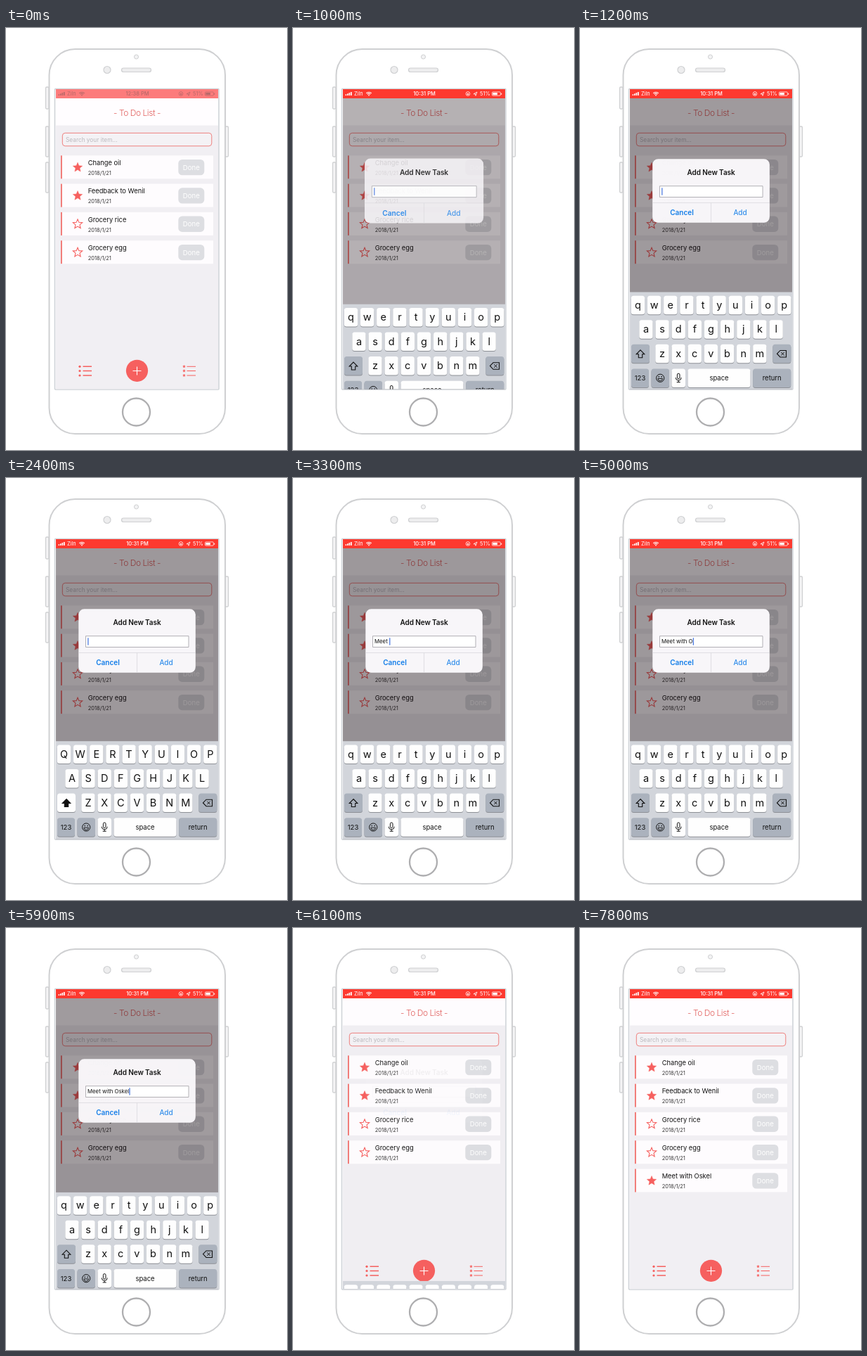
Animation, 400 px wide and 600 px high, one loop 8 s. Source, as an HTML page with a canvas:

```html
<!DOCTYPE html>
<html lang="en">
<head>
<meta charset="utf-8">
<title>To Do List</title>
<style>
  html, body { margin: 0; width: 100%; height: 100%; overflow: hidden; background: #fff; }
  canvas { display: block; width: 400px; height: 600px; }
</style>
</head>
<body>
<canvas></canvas>
<script>
const LOOP = 8000;
const OPEN = 850, CLOSE = 5900, ITEM_ADDED = 6200, ITEM_STARRED = 7000;
const RED = '#f6605f', INK = '#111';
const typing = [
  [2500, 'M'], [2700, 'e'], [2900, 'e'], [3000, 't'], [3300, ' '],
  [3800, 'w'], [4000, 'i'], [4100, 't'], [4200, 'h'], [4400, ' '],
  [4900, 'O'], [5200, 's'], [5400, 'k'], [5600, 'e'], [5700, 'l']
];
const tasks = [
  ['Change oil', true], ['Feedback to Wenil', true],
  ['Grocery rice', false], ['Grocery egg', false]
];

const canvas = document.querySelector('canvas');
const ctx = canvas.getContext('2d');
const scale = window.devicePixelRatio || 1;
canvas.width = 400 * scale;
canvas.height = 600 * scale;

const between = (t, from, to) => t >= from && t < to;
const mix = (a, b, p) => `rgb(${a.map((v, i) => Math.round(v + (b[i] - v) * p))})`;

function paint(fill, stroke, width = 1) {
  if (fill) { ctx.fillStyle = fill; ctx.fill(); }
  if (stroke) { ctx.strokeStyle = stroke; ctx.lineWidth = width; ctx.stroke(); }
}

function box(x, y, w, h, r, fill, stroke, width) {
  ctx.beginPath();
  ctx.roundRect(x, y, w, h, r);
  paint(fill, stroke, width);
}

function circle(x, y, r, fill, stroke, width) {
  ctx.beginPath();
  ctx.arc(x, y, r, 0, Math.PI * 2);
  paint(fill, stroke, width);
}

// Draws a polyline through [x, y] points.
function path(points, fill, stroke, width, closed = false) {
  ctx.beginPath();
  points.forEach(([x, y]) => ctx.lineTo(x, y));
  if (closed) ctx.closePath();
  paint(fill, stroke, width);
}

function arc(x, y, r, from, to, stroke, width) {
  ctx.beginPath();
  ctx.arc(x, y, r, from * Math.PI, to * Math.PI);
  paint(null, stroke, width);
}

function text(string, x, y, size, color, { weight = 400, align = 'left', spacing = 0 } = {}) {
  ctx.font = `${weight} ${size}px Inter, Roboto, sans-serif`;
  ctx.letterSpacing = spacing + 'px';
  ctx.textAlign = align;
  ctx.fillStyle = color;
  ctx.fillText(string, x, y);
  return ctx.measureText(string).width;
}

function star(x, y, r, filled) {
  const points = Array.from({ length: 10 }, (_, i) => {
    const angle = (i / 5 - 0.5) * Math.PI, radius = i % 2 ? r * 0.45 : r;
    return [x + radius * Math.cos(angle), y + radius * Math.sin(angle)];
  });
  path(points, filled ? RED : null, RED, filled ? 0.5 : 1.1, true);
}

function drawDevice() {
  const edge = '#cfd0d2';
  for (const [x, y, h] of [[56.5, 84, 31], [56.5, 140, 43], [56.5, 191, 43], [312, 140, 43]])
    box(x, y, 4.5, h, 1.5, '#f4f4f5', edge, 1.3);
  box(61.5, 30, 250.5, 547, 37, '#fff', edge, 2);
  circle(185.5, 41, 3, '#f3f3f4', edge, 1);
  circle(144, 59.5, 5, '#ededee', edge, 1.2);
  box(164.5, 57, 42, 5.5, 2.8, '#ededee', edge, 1.2);
  circle(185.5, 546, 19.5, '#fff', '#aeaeb0', 2.3);
  box(69.5, 86.5, 233.5, 427.5, 1, '#fff', '#cdd1d6', 1.5);
}

function drawStatusBar(t) {
  const p = Math.min(t / 400, 1);
  const color = mix([185, 105, 105], [255, 255, 255], p);
  ctx.fillStyle = mix([252, 123, 123], [253, 57, 47], p);
  ctx.fillRect(71, 87, 231, 13);
  for (let i = 0; i < 4; i++) {
    const h = 1.7 + i * 1.1;
    box(74.5 + i * 2.5, 96 - h, 1.7, h, 0.4, color);
  }
  text('Ziln', 87, 96.2, 7.4, color);
  arc(108, 96.5, 5.3, 1.25, 1.75, color, 1.1);
  arc(108, 96.5, 3.2, 1.25, 1.75, color, 1.1);
  circle(108, 95.6, 0.9, color);
  text(t < 100 ? '12:38 PM' : '10:31 PM', 187, 96.2, 7.5, color, { weight: 500, align: 'center' });
  circle(249, 93.5, 2.8, null, color, 0.8);
  box(247.8, 93, 2.4, 1.8, 0.3, color);
  path([[257, 93.8], [262, 91], [260, 96.3], [259.6, 93.9]], null, color, 0.8, true);
  text('51%', 266, 96.2, 7.4, color);
  box(283.4, 90.9, 12, 5.3, 1.3, null, color, 0.7);
  box(284.4, 91.9, 6.5, 3.3, 0.5, color);
  box(296.2, 92.5, 1, 2.2, 0.5, color);
}

function drawTask([name, starred], index) {
  const y = 181.3 + index * 40.3;
  ctx.fillStyle = '#fefcfe';
  ctx.fillRect(78, y, 217, 33);
  ctx.fillStyle = '#f0706d';
  ctx.fillRect(78, y, 1.8, 33);
  star(102, y + 17, 7, starred);
  text(name, 116.7, y + 13.8, 9.3, INK);
  text('2018/1/21', 116.7, y + 27.8, 7.5, '#333');
  box(245.3, y + 5.7, 37, 22.3, 5.5, '#dddee2');
  text('Done', 263.8, y + 20.3, 9.6, '#fff', { align: 'center' });
}

function drawListIcon(x, stars) {
  [481.3, 487.5, 494].forEach(y => {
    if (stars) star(x + 2, y, 1.9, true);
    else circle(x + 1.5, y, 1.6, RED);
    path([[x + 6, y], [x + 18.5, y]], null, RED, stars ? 1 : 1.6);
  });
}

function drawList(t) {
  ctx.fillStyle = '#f1eff3';
  ctx.fillRect(71, 100, 231, 414);
  ctx.fillStyle = '#fffdff';
  ctx.fillRect(71, 100, 231, 38.5);
  text('- To Do List -', 186.5, 125.3, 12, '#e2615f', { weight: 300, align: 'center', spacing: -0.45 });
  box(80.3, 149.3, 212.5, 18.5, 4, '#f4f2f5', '#ee7f7c', 1);
  text('Search your item...', 85, 161.5, 8.3, '#bbb9be');

  const items = t < ITEM_ADDED ? tasks : [...tasks, ['Meet with Oskel', t >= ITEM_STARRED]];
  items.forEach(drawTask);

  drawListIcon(103.5, false);
  drawListIcon(251.5, true);
  circle(186.5, 487.3, 15.6, RED);
  path([[180.5, 487.5], [192.5, 487.5]], null, '#fff', 1.1);
  path([[186.5, 481.5], [186.5, 493.5]], null, '#fff', 1.1);
}

function drawDialog(t, shown) {
  const zoom = t < CLOSE ? 1.12 - 0.12 * shown : 1;
  ctx.save();
  ctx.globalAlpha = shown ** 1.2;
  ctx.translate(186.5, 231.5);
  ctx.scale(zoom, zoom);
  ctx.translate(-186.5, -231.5);
  box(103.3, 186.3, 166.5, 90.5, 8, '#f8f6f9');
  text('Add New Task', 186.5, 209, 10, INK, { weight: 600, align: 'center', spacing: -0.1 });
  box(113.5, 224.7, 146.5, 15.8, 0, '#fff', '#aaa8ad', 0.9);
  const typed = typing.filter(([time]) => t >= time).map(([, char]) => char).join('');
  const caret = 116 + text(typed, 116, 235.3, 7.8, INK);
  ctx.fillStyle = '#3f70dd';
  ctx.fillRect(caret + 0.3, 227.3, 1.2, 10.4);
  path([[103.3, 248.5], [269.8, 248.5]], null, '#dad9de', 0.8);
  path([[186.5, 248.5], [186.5, 276.8]], null, '#dad9de', 0.8);
  text('Cancel', 145, 266, 10, '#0f7be8', { weight: 600, align: 'center' });
  text('Add', 228, 266, 10, '#0f7be8', { align: 'center' });
  ctx.restore();
}

function key(x, y, w, dark, label, size = 9.5) {
  box(x, y + 1, w, 26.5, 3.5, '#8d9096');
  box(x, y, w, 26.5, 3.5, dark ? '#abb2bd' : '#fefefe');
  if (label) text(label, x + w / 2, y + (size > 10 ? 18.2 : 16.6), size, INK, { align: 'center' });
}

function drawKeyboard(t, shown) {
  const shift = between(t, 2000, 2500) || between(t, 4600, 4900);
  const spaceDown = between(t, 3200, 3300) || between(t, 4300, 4400);
  ctx.save();
  ctx.translate(0, 139 * (1 - shown) - 0.8);
  ctx.fillStyle = '#d2d5db';
  ctx.fillRect(71, 375, 231, 140);

  [['qwertyuiop', 72.8, 380.3], ['asdfghjkl', 84.3, 414.8], ['zxcvbnm', 107.3, 449.3]].forEach(([row, x, y]) => {
    const letters = shift ? row.toUpperCase() : row;
    [...letters].forEach((char, i) => key(x + i * 23.15, y, 19.3, false, char, 14.5));
  });

  key(73, 449.3, 26, !shift);
  path([[86, 457.3], [91.8, 463.3], [88.7, 463.3], [88.7, 468.3], [83.3, 468.3], [83.3, 463.3], [80.2, 463.3]],
    shift ? INK : null, INK, 1.1, true);
  key(274.3, 449.3, 26, true);
  path([[280.5, 462.7], [285, 458], [293.5, 458], [293.5, 467.5], [285, 467.5]], null, INK, 1.1, true);
  path([[286.3, 460.5], [290.7, 465]], null, INK, 1);
  path([[290.7, 460.5], [286.3, 465]], null, INK, 1);

  key(73, 484, 25, true, '123');
  key(101.5, 484, 25.5, true);
  circle(114.2, 497.3, 5.6, null, INK, 1);
  circle(112.2, 495.4, 0.8, INK);
  circle(116.2, 495.4, 0.8, INK);
  ctx.beginPath();
  ctx.arc(114.2, 498, 3.3, 0, Math.PI);
  ctx.closePath();
  paint(null, INK, 0.9);
  key(130.5, 484, 19.5, false);
  box(138.4, 490.7, 3.6, 7.5, 1.8, null, INK, 1);
  arc(140.2, 496.5, 4, 0, 1, INK, 1);
  path([[140.2, 500.5], [140.2, 503]], null, INK, 1);
  path([[137.7, 503], [142.7, 503]], null, INK, 1);
  key(153.5, 484, 89, spaceDown, 'space');
  key(246.2, 484, 54, true, 'return');
  ctx.restore();
}

function dialogVisibility(t) {
  if (t < OPEN) return 0;
  const p = t < CLOSE ? 1 - Math.exp((OPEN - t) / 75) : Math.exp((CLOSE - t) / 80);
  return p < 0.01 ? 0 : p;
}

function draw(now) {
  const t = now % LOOP;
  const shown = dialogVisibility(t);
  ctx.setTransform(scale, 0, 0, scale, 0, 0);
  ctx.fillStyle = '#fff';
  ctx.fillRect(0, 0, 400, 600);
  drawDevice();
  ctx.save();
  ctx.beginPath();
  ctx.rect(71, 87, 231, 426.5);
  ctx.clip();
  drawList(t);
  if (shown) {
    ctx.fillStyle = `rgba(12, 0, 6, ${0.4 * shown ** 2})`;
    ctx.fillRect(71, 100, 231, 414);
    drawDialog(t, shown);
    drawKeyboard(t, shown);
  }
  drawStatusBar(t);
  ctx.restore();
}

const start = performance.now();
function frame() {
  draw(performance.now() - start);
  requestAnimationFrame(frame);
}
frame();
</script>
</body>
</html>
```
